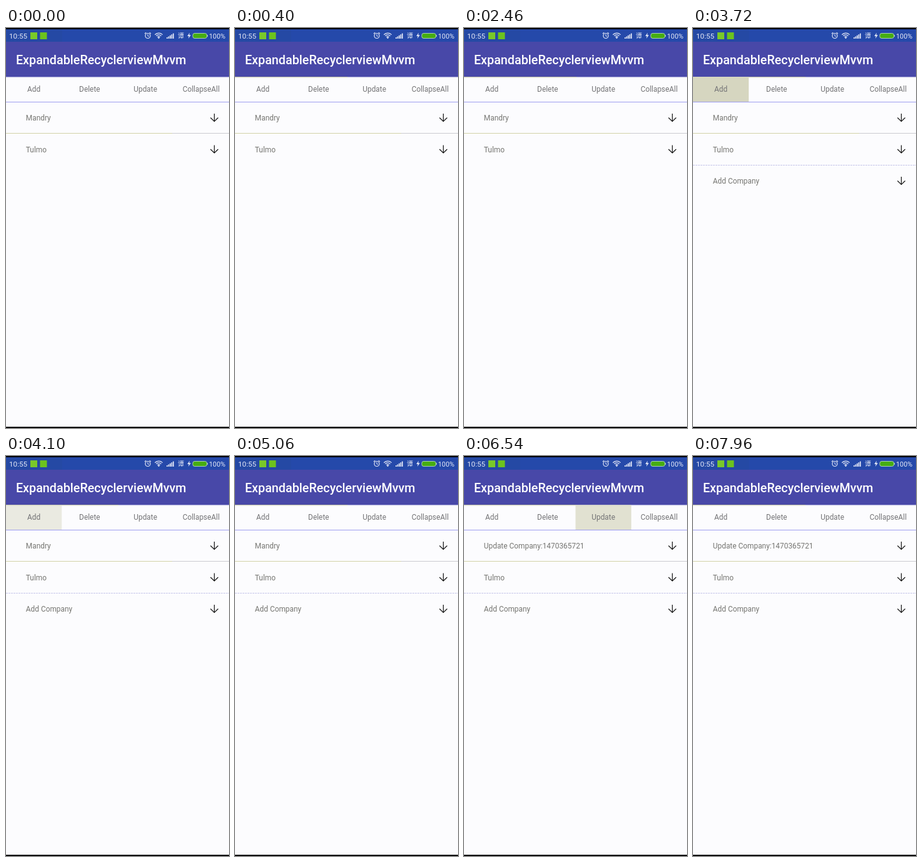
Write an HTML page with a canvas that moves like this. It is 357 by 640 pixels and loops after 8000 ms.

```html
<!DOCTYPE html>
<html lang="en">
<head>
<meta charset="utf-8">
<title>Expandable list</title>
<style>
  html, body { margin: 0; width: 100%; height: 100%; overflow: hidden; background: #fcfcfe; }
  canvas { display: block; width: 357px; height: 640px; }
</style>
</head>
<body>
<canvas id="stage"></canvas>
<script>
const W = 357, H = 640, LOOP = 8000;
const CELL = W / 4, BAR_TOP = 78, BAR_BOTTOM = 118, ROW_STEP = 50.5;
const INK = '#767672', PALE = '#e4e8f6', SANS = 'Roboto, sans-serif';
const canvas = document.getElementById('stage');
const ctx = canvas.getContext('2d');
const scale = window.devicePixelRatio || 1;
canvas.width = Math.round(W * scale);
canvas.height = Math.round(H * scale);

const clamp = v => Math.max(0, Math.min(1, v));
const ramp = (t, from, length) => clamp((t - from) / length);
const easeOut = v => 1 - (1 - v) ** 2;
const lerp = (a, b, v) => a + (b - a) * v;

function rect(x, y, w, h, color) {
  ctx.fillStyle = color;
  ctx.fillRect(x, y, w, h);
}

function text(str, x, y, size, color, weight = 400, align = 'left', family = SANS) {
  ctx.font = `${weight} ${size}px ${family}`;
  ctx.textAlign = align;
  ctx.fillStyle = color;
  ctx.fillText(str, x, y);
}

function line(points, color, width) {
  ctx.beginPath();
  points.forEach(([x, y], i) => i ? ctx.lineTo(x, y) : ctx.moveTo(x, y));
  ctx.strokeStyle = color;
  ctx.lineWidth = width;
  ctx.stroke();
}

function arc(x, y, r, from, to, width) {
  ctx.beginPath();
  ctx.arc(x, y, r, from, to);
  ctx.strokeStyle = PALE;
  ctx.lineWidth = width;
  ctx.stroke();
}

function faded(alpha, draw) {
  if (alpha <= 0) return;
  ctx.save();
  ctx.globalAlpha = alpha;
  draw();
  ctx.restore();
}

function statusBar() {
  rect(0, 2, W, 20, '#2549aa');
  rect(0, 2, 90, 20, '#2549a4');
  text('10:55', 5, 17, 11.7, PALE);
  rect(39, 7, 11, 11, '#79c929');
  rect(54.5, 7, 11, 11, '#6cc31e');

  // alarm clock
  arc(227, 12.5, 4, 0, Math.PI * 2, 1.2);
  line([[227, 10], [227, 12.8], [229, 13.4]], PALE, 1);
  line([[222, 9.3], [224.3, 7.3]], PALE, 1.2);
  line([[232, 9.3], [229.7, 7.3]], PALE, 1.2);

  // wireless
  for (const r of [2.8, 5.6, 8.4]) arc(244.5, 16.5, r, -Math.PI * 0.76, -Math.PI * 0.24, 1.3);
  ctx.beginPath();
  ctx.arc(244.5, 15.8, 1.2, 0, Math.PI * 2);
  ctx.fillStyle = PALE;
  ctx.fill();

  // signal
  for (let i = 0; i < 5; i++) {
    const h = 2 + i * 1.6;
    rect(257 + i * 2.5, 17 - h, 1.7, h, PALE);
  }
  text('谭', 275, 16.2, 10, PALE, 400, 'left', '"Noto Sans CJK SC", "Noto Sans CJK", sans-serif');

  // charging battery
  ctx.beginPath();
  ctx.moveTo(294, 7.5);
  ctx.lineTo(290.3, 13);
  ctx.lineTo(292.8, 13);
  ctx.lineTo(291.8, 17);
  ctx.lineTo(296, 11.3);
  ctx.lineTo(293.3, 11.3);
  ctx.fillStyle = PALE;
  ctx.fill();
  ctx.beginPath();
  ctx.roundRect(299, 8.5, 22.5, 8, 3);
  ctx.fillStyle = '#46ad12';
  ctx.fill();
  ctx.strokeStyle = '#a9cfb4';
  ctx.lineWidth = 1;
  ctx.stroke();
  rect(322, 11, 1, 3, '#a9cfb4');
  text('100%', 325, 16.5, 10.8, PALE);
}

function appBar(t) {
  rect(0, 22, W, 56, '#4848a8');
  text('ExpandableRecyclerviewMvvm', 15.9, 57.5, 19.75, '#ffffff', 500);
  rect(0, 78, W, 1, '#c0c0e4');
  rect(0, 79, W, 1, '#ececf6');
  if (t >= 20) rect(0, 78, 180, 1, '#d2d2ae');
}

// Each tap spreads from the touch point, holds, then fades away.
function ripple(t, column, touchX, start) {
  const age = t - start;
  if (age < 0 || age > 1040) return;
  const grow = easeOut(ramp(age, 0, 380));
  const left = column * CELL;
  faded(ramp(age, 0, 80) * (1 - ramp(age, 520, 520)), () => {
    ctx.beginPath();
    ctx.rect(left, BAR_TOP, CELL, BAR_BOTTOM - BAR_TOP);
    ctx.clip();
    ctx.beginPath();
    ctx.arc(lerp(touchX, left + CELL / 2, grow), 98, 50 * grow, 0, Math.PI * 2);
    ctx.fillStyle = '#d6d6c0';
    ctx.fill();
  });
}

function buttons(t) {
  ripple(t, 0, 48, 3310);
  ripple(t, 2, 240, 5868);
  ['Add', 'Delete', 'Update', 'CollapseAll'].forEach((label, i) =>
    text(label, (i + 0.5) * CELL, 102.3, 11.9, '#747476', 400, 'center'));
  rect(0, BAR_BOTTOM, W, 1, '#9c9cf0');
}

function row(index, label, alpha = 1) {
  const mid = 143.5 + index * ROW_STEP;
  faded(alpha, () => {
    text(label, 31.8, mid + 4.5, 11.9, INK);
    line([[333.5, mid - 6.5], [333.5, mid + 5.6]], '#111111', 1.2);
    line([[327.4, mid], [333.5, mid + 6], [339.6, mid]], '#111111', 1.2);
  });
}

function list(t) {
  rect(0, 168, W, 1, '#cacad0');
  rect(0, 168, 266, 1, '#d2d2a8');
  const change = ramp(t, 5880, 240);
  row(0, 'Mandry', 1 - change);
  row(0, 'Update Company:1470365721', change);
  row(1, 'Tulmo');
  if (t >= 3360) {
    ctx.save();
    ctx.setLineDash([3, 1]);
    line([[0, 219.5], [W, 219.5]], '#c6c6ea', 1);
    ctx.restore();
    row(2, 'Add Company', ramp(t, 3390, 140));
  }
}

function frame(now) {
  const t = now % LOOP;
  ctx.setTransform(scale, 0, 0, scale, 0, 0);
  rect(0, 0, W, H, '#fcfcfe');
  rect(0, 0, W, 2, '#000000');
  statusBar();
  appBar(t);
  buttons(t);
  list(t);
  rect(0, 638, W, 2, '#000000');
  requestAnimationFrame(frame);
}
requestAnimationFrame(frame);
</script>
</body>
</html>
```
